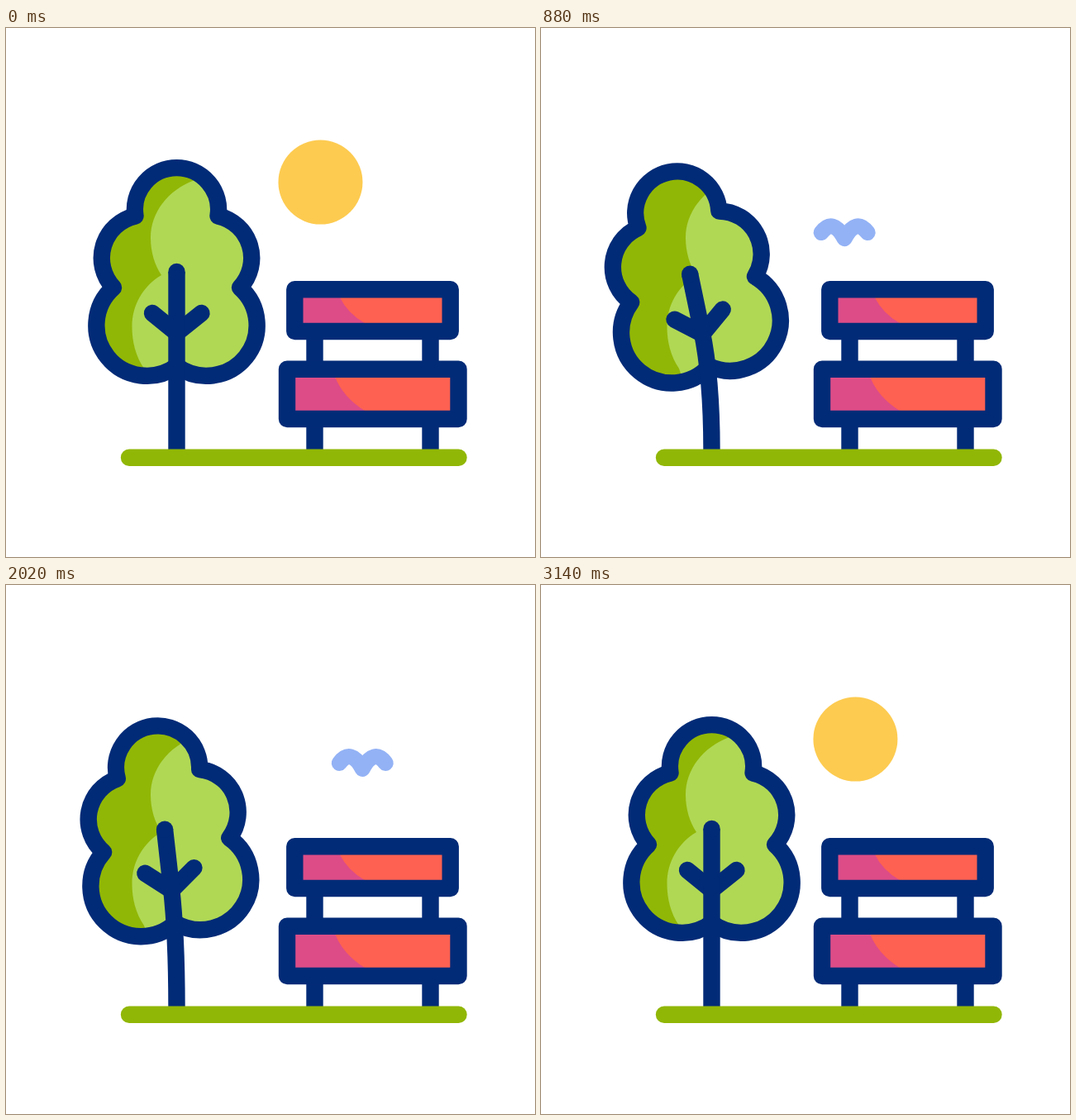
Recreate the animation shown at these times as an HTML page. Size 640 by 640 pixels, loop 3200 ms.

```html
<!DOCTYPE html>
<html lang="en">
<head>
<meta charset="utf-8">
<title>Park bench</title>
<style>
  html, body { margin: 0; width: 100%; height: 100%; overflow: hidden; background: #fff; }
  svg { display: block; width: 100%; height: 100%; }
  .line { fill: none; stroke: #022b77; stroke-width: 20.4; stroke-linecap: round; stroke-linejoin: round; }
  .bird { fill: none; stroke: #93b2f5; stroke-width: 19; stroke-linecap: round; stroke-linejoin: round; }
</style>
</head>
<body>
<svg viewBox="0 0 640 640">
  <defs>
    <path id="crown" d="M206.5 409A61.05 61.05 0 0 1 130 314A52 52 0 0 1 156.5 227.5A50.6 50.6 0 1 1 256.5 227.5A52 52 0 0 1 283 314A61.05 61.05 0 0 1 206.5 409Z"/>
    <clipPath id="crownClip"><use href="#crown" class="sway"/></clipPath>
  </defs>

  <circle id="sun" r="51" fill="#fdcb50"/>
  <path class="bird"/>
  <path class="bird"/>

  <use href="#crown" class="sway" fill="#91b706"/>
  <!-- the lit side stays put while the crown sways over it -->
  <g clip-path="url(#crownClip)">
    <path fill="#b0d855" d="M250 177L228 184C196 196 175 223 175 254C175 271 180 287 188 299C166 312 152.500 335 152.500 361C152.500 380 157 397 167 412L180 450H420V140H215Z"/>
  </g>
  <g class="sway">
    <use href="#crown" class="line"/>
    <path class="line" d="M177 345L206.500 369L236.500 345"/>
  </g>
  <path id="trunk" class="line" style="stroke-linecap:butt"/>
  <circle id="trunkTip" r="10.2" fill="#022b77"/>

  <path class="line" style="stroke-linecap:butt" d="M373.500 367V412M513.500 367V412M373.500 473V510M513.500 473V510"/>
  <path fill="#fe6151" d="M349 316H538V367H349ZM340 412.500H547.500V473H340Z"/>
  <path fill="#dd4c87" d="M349 316H400L404 326Q413 345 434 357V367H349ZM340 412.500H394L398 422Q408 447 434 463V473H340Z"/>
  <path class="line" d="M349.300 316.300H537.700V367H349.300ZM340 412.700H547.500V473H340Z"/>
  <path d="M149 519.700H547.500" stroke="#91b706" stroke-width="20.4" stroke-linecap="round"/>
</svg>
<script>
const LOOP = 3200;
const PIVOT = { x: 206.5, y: 424 };
const SWAY = [[0, 0], [830, -12], [1195, -7.2], [1560, -12], [1925, -7], [2730, 9.5], [3150, 0]];
// angles from the top of the sun's arc
const SUN = [[0, 20.3], [1080, -58], [2155, -42], [3150, 20.3]];
const BIRDS = [
  { x: 415, y: 212.5, vx: 0.15, vy: -0.026, ax: 0, ay: 1e-4, fadeIn: 600, fadeOut: 1730, phase: 0.6 },
  { x: 341, y: 268.5, vx: 0.0981, vy: -0.0962, ax: 3.93e-5, ay: 1.047e-4, fadeIn: 1060, fadeOut: 2200, phase: 0 }
];
const FADE = 200, FLAP = 440;

const $ = id => document.getElementById(id);
const swaying = document.querySelectorAll('.sway');
const birds = document.querySelectorAll('.bird');
const rad = deg => deg * Math.PI / 180;
const clamp = v => Math.min(1, Math.max(0, v));

function eased(keys, t) {
  const i = keys.findIndex(k => k[0] > t);
  if (i < 0) return keys[keys.length - 1][1];
  const [t0, a] = keys[i - 1], [t1, b] = keys[i];
  return a + (b - a) * (1 - Math.cos(Math.PI * (t - t0) / (t1 - t0))) / 2;
}

function drawTree(t) {
  const angle = eased(SWAY, t);
  const along = d => [PIVOT.x + d * Math.sin(rad(angle)), PIVOT.y - d * Math.cos(rad(angle))];
  swaying.forEach(el => el.setAttribute('transform', `rotate(${angle} ${PIVOT.x} ${PIVOT.y})`));
  const tip = along(129);
  $('trunk').setAttribute('d', `M206.5 510Q${PIVOT.x} ${PIVOT.y} ${along(60)}L${tip}`);
  $('trunkTip').setAttribute('cx', tip[0]);
  $('trunkTip').setAttribute('cy', tip[1]);
}

function drawSun(t) {
  // fully behind the crown here; it comes back from a higher point
  const hidden = t > 1080 && t < 2155;
  const a = rad(t < 1080 ? eased(SUN.slice(0, 2), t) : eased(SUN, t));
  $('sun').setAttribute('cx', 317.1 + 182.6 * Math.sin(a));
  $('sun').setAttribute('cy', 357.8 - 182.6 * Math.cos(a));
  $('sun').setAttribute('visibility', hidden ? 'hidden' : 'visible');
}

function drawBird(el, b, t) {
  const s = t - 1200, bend = s * (s - 520);
  const x = b.x + b.vx * s + b.ax * bend;
  const y = b.y + b.vy * s + b.ay * bend;
  const drop = 5 + 3 * Math.cos(2 * Math.PI * (s / FLAP + b.phase));
  const opacity = Math.min(clamp((t - b.fadeIn) / FADE), clamp((b.fadeOut + FADE - t) / FADE));
  el.setAttribute('d', `M-28 0Q-14 -18.500 0 ${drop}Q14 -18.500 28 0`);
  el.setAttribute('transform', `translate(${x} ${y})`);
  el.setAttribute('opacity', opacity);
}

function draw(t) {
  drawTree(t);
  drawSun(t);
  birds.forEach((el, i) => drawBird(el, BIRDS[i], t));
}

const start = performance.now();
function tick(now) {
  draw(Math.max(0, now - start) % LOOP);
  requestAnimationFrame(tick);
}
draw(0);
requestAnimationFrame(tick);
</script>
</body>
</html>
```
